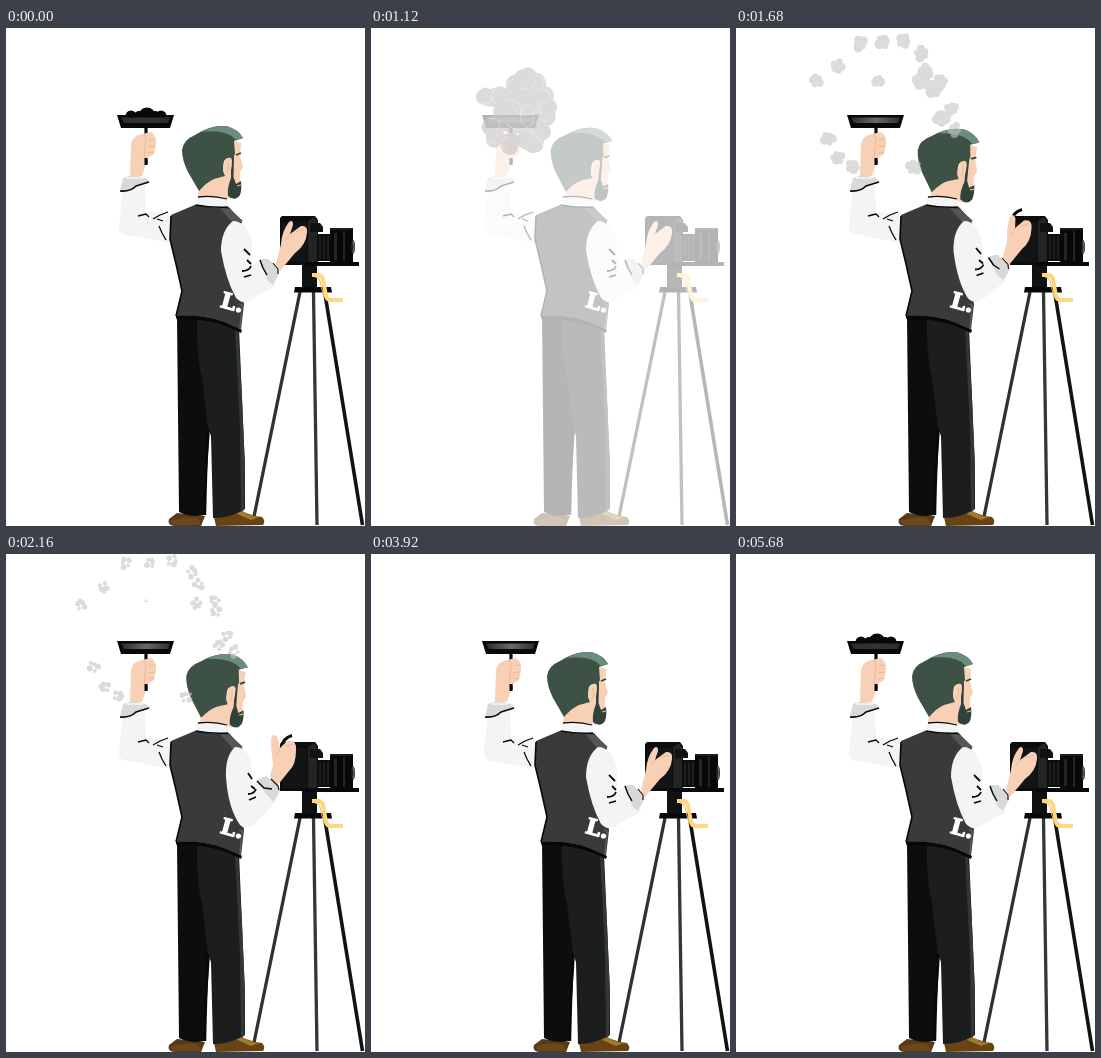
Animation, 359 px wide and 498 px high, one loop 5760 ms. Source, as an HTML page with a canvas:

```html
<!DOCTYPE html>
<html lang="en">
<head>
<meta charset="utf-8">
<title>Flash powder photographer</title>
<style>
html, body { margin: 0; width: 100%; height: 100%; overflow: hidden; background: #fff; }
canvas { display: block; }
</style>
</head>
<body>
<canvas id="stage" width="359" height="498"></canvas>
<script>
const ctx = document.getElementById('stage').getContext('2d');
const LOOP = 5760, STEP = 80;
const INK = '#070808', SKIN = '#f8d0b5', SHADE = '#e9b999', SHIRT = '#f4f4f4', CUFF = '#d9d9d9';

const mix = (a, b, k) => a + (b - a) * k;
const ramp = (t, a, b) => Math.min(1, Math.max(0, (t - a) / (b - a)));
const ease = (t, a, b) => { const k = ramp(t, a, b); return k * k * (3 - 2 * k); };

function fill(d, color) {
  ctx.fillStyle = color;
  ctx.fill(new Path2D(d));
}

function line(d, color, width = 1) {
  ctx.strokeStyle = color;
  ctx.lineWidth = width;
  ctx.stroke(new Path2D(d));
}

function box(x, y, w, h, color) {
  ctx.fillStyle = color;
  ctx.fillRect(x, y, w, h);
}

function turned(x, y, degrees, draw, dx = 0, dy = 0) {
  ctx.save();
  ctx.translate(x + dx, y + dy);
  ctx.rotate(degrees * Math.PI / 180);
  ctx.translate(-x, -y);
  draw();
  ctx.restore();
}

// Blends two path strings that share the same commands.
function blend(a, b, k) {
  const to = b.match(/[\d.]+/g);
  let i = 0;
  return a.replace(/[\d.]+/g, n => mix(+n, +to[i++], k).toFixed(2));
}

function tripod() {
  line('M294 264L247.500 491', '#303132', 3.3);
  line('M307.500 264L311 497', '#353637', 3.3);
  line('M319 266L356.500 497', '#111213', 3.6);
  box(296, 236, 15, 25, '#101112');
  fill('M289 259H325L326 264.500H288Z', INK);
  line('M306 247H313Q316 248 317 251L320 268Q321 272 325 272H337', '#ffd77f', 4);
  line('M309 249Q313 249 314 253L318 270', '#e9b957', 1);
}

function camera() {
  fill('M274 190L276 188H309L312 192V237H274Z', '#0b0c0d');
  box(276, 194, 25, 40, '#131415');
  fill('M302 193L308 189L311 193V235H302Z', '#222425');
  fill('M304 195H314L317 199V204H304Z', '#101112');
  box(312, 206, 13, 27, '#0c0d0e');
  for (let x = 314; x < 325; x += 4) line(`M${x} 208V231`, '#303233');
  box(324, 200, 23, 36, INK);
  box(328, 205, 3, 27, '#232526');
  box(337, 203, 2, 30, '#232526');
  line('M324 201H347', '#303233');
  ctx.fillStyle = '#202223';
  ctx.beginPath();
  ctx.ellipse(347, 219, 2, 7, 0, 0, 7);
  ctx.fill();
  line('M347 213Q349 219 347 225', '#777', 1);
  box(300, 234, 53, 4, INK);
}

function trousers() {
  fill('M171 485L163 491Q161 497 168 498H195L199 488Z', '#573a17');
  fill('M164 493Q177 488 191 490L196 497H168Z', '#6b491d');
  fill('M208 489L233 482Q246 488 256 489Q260 493 257 497L210 498Z', '#684314');
  fill('M229 485L236 483Q243 488 253 489L245 492Z', '#a27a2c');
  fill('M171 289L205 290L204 400L198 487Q185 490 173 484Z', '#0c0e0e');
  fill('M191 289L233 300L236 370L239 440L239 481Q225 490 207 490L205 408L202 400L196 350Q190 325 191 289Z', '#1b1e1d');
  fill('M229 300H232L236 370L239 440L238 482L235 484L234 400Z', '#343737');
  line('M202 400Q200 440 199 487', INK, 2.4);
}

function vest() {
  fill('M170 288Q204 286 236 302L235 305Q206 289 171 292Z', INK);
  fill('M165 187L191 176Q207 180 223 179L236 194L228 220L238 276L235 302Q204 285 170 288L176 263L170 235L164 211Z', '#3a3a3a');
  fill('M214 180L224 181L237 193L227 195Z', '#555656');
  line('M165 188L164 211L170 236L176 263L170 288', INK, 1.6);
  line('M170 289Q204 286 235 303', INK, 2.4);
  line('M233 276L236 277L234 301', '#5a5b5b', 1.5);
  turned(214, 280, 15, () => {
    ctx.fillStyle = ctx.strokeStyle = '#fff';
    ctx.lineWidth = 1.2;
    ctx.font = 'bold 22px "DejaVu Serif", "Noto Serif", serif';
    ctx.fillText('L.', 213, 279);
    ctx.strokeText('L.', 213, 279);
  });
}

function head(k) {
  turned(205, 172, 4.2 * k, () => {
    fill('M193 161L213 147L226 147L225 171Q207 167 192 169Z', SKIN);
    fill('M225 112L235 115L234 128L237 139L234 144L234 158L224 165L222 135Z', SKIN);
    fill('M225 126L228 128L227.500 149L230 156L235 153Q236 161 234 167Q229 174 222 168Q221 160 225 150Z', '#304338');
    fill('M176 122Q177 112 189 107Q204 97 219 98Q232 101 237 110L228 113L229 126L226 131Q221 128 218 133Q216 141 219 148L208 151Q201 154 193 163L182 144Q176 132 176 122Z', '#3e5145');
    fill('M194 104Q208 97 221 98Q232 101 237 110L230 112Q221 101 194 104Z', '#6b8d7c');
    fill('M219 132Q225 127 226 132Q226 142 223 148Q218 149 217 142Z', SKIN);
    line('M222 134Q224 140 221 145', SHADE);
    line('M230 127L235 125', '#304338', 1.8);
    line('M231 158L235 157', SHADE, 1.2);
  }, 2 * k, 2 * k);
  fill('M191 169Q206 167 221 171L223 179Q207 181 190 177Z', SHIRT);
  line('M192 169Q207 167 221 171', INK, 1.3);
  line('M190 177Q206 180 222 179', INK, 1.3);
}

function rightArm(k) {
  const sleeve = blend(
    'M227 193Q215 202 215 223Q220 252 230 270Q239 279 249 269L270 258L255 232L246 237L246 215Q241 193 227 193Z',
    'M229 193Q219 202 220 223Q222 254 234 271Q239 276 248 271L269 248L251 225L247 232L246 213Q242 193 229 193Z', k);
  fill(sleeve, SHIRT);
  line(blend('M238 221L244 227M241 232L245 236M236 243Q243 243 245 238M238 249L245 247',
             'M242 219L246 225M245 232L249 235M242 240Q248 240 250 235M243 246L250 243', k), INK, 1.8);
  const hand = blend(
    'M270 236L275 216Q276 203 283 194Q287 191 287 197L284 206L295 198Q302 197 301 205Q300 217 289 225L274 243Z',
    'M264 222L267 211Q265 195 265 184Q268 178 272 184L274 194L281 187Q291 185 290 196Q290 211 283 217L271 232Z', k);
  if (k > .4) line('M275 194Q277 184 286 181.500', INK, 3);
  fill(hand, SKIN);
  line(blend('M284 206L280 212M290 204L298 201', 'M274 194L271 202M279 193L287 190', k), SHADE);
  fill(blend('M254 231L262 231L272 240L273 246L267 257L261 252Z',
             'M251 226L260 222L272 231L274 237L268 248L260 240Z', k), CUFF);
  line(blend('M254 232L257 240L261 247', 'M251 227L258 234L266 235', k), INK, 1.5);
  line(blend('M267 235L272 241L272 246', 'M265 225L272 232L273 236', k), INK, 1.1);
}

function tray(powder) {
  ctx.fillStyle = INK;
  if (powder > 0) {
    for (const [x, r] of [[125, 5], [133, 4.5], [141, 8], [149, 4.5], [155, 5]]) {
      ctx.beginPath();
      ctx.arc(x, 88, r * powder + .5, Math.PI, 0);
      ctx.fill();
    }
  }
  line('M140 98V136', INK, 3.2);
  fill('M111 87H168L164 100H115Z', INK);
  const metal = ctx.createLinearGradient(115, 0, 165, 0);
  metal.addColorStop(0, '#2b2d2d');
  metal.addColorStop(.5, powder > .5 ? '#333535' : '#686b6b');
  metal.addColorStop(1, '#2b2d2d');
  fill('M115 89.500H164L162 95H118Z', metal);
}

function leftArm(angle, powder) {
  fill('M164 186L143 184L118 198Q116 206 123 207L164 215Z', SHIRT);
  turned(126, 200, angle, () => {
    tray(powder);
    fill('M124 149L125 116Q127 107 136 106L145 104Q151 108 150 116L148 126L142 130L136 148Z', SKIN);
    line('M138 106L140 111L138 130M143 112L149 111M142 119L149 118M142 125L148 124', SHADE);
    line('M140 130V137', INK, 3);
    fill('M117 160L139 157L140 187L126 207Q112 208 113 198Z', SHIRT);
    fill('M117 150L126 147L140 150L144 154L132 158L126 162L114 163Z', CUFF);
    line('M114 163Q124 164 130 158L143 154', INK, 1.7);
    line('M120 150L137 150', '#eee', 2);
  });
  line('M132 188L140 186L143 189M147 191L154 187L162 184M151 191L157 193M153 198L156 205L160 212', INK, 1.3);
}

// Each puff: start x, y, radius, then resting x, y.
const puffs = [
  [160, 39, 20, 145, 8], [146, 48, 17, 119, 9], [174, 43, 15, 167, 7],
  [106, 62, 14, 75, 50], [123, 61, 16, 97, 34], [181, 62, 17, 187, 18],
  [186, 84, 16, 208, 46], [177, 105, 17, 193, 31], [115, 100, 15, 88, 112],
  [118, 116, 14, 98, 133], [137, 124, 15, 113, 142], [165, 120, 18, 180, 142],
  [150, 85, 32, 140, 47], [187, 77, 15, 222, 81], [174, 124, 11, 227, 97],
  [160, 68, 28, 191, 50], [168, 88, 25, 213, 90], [138, 82, 25, 209, 57]
];

function smoke(t) {
  if (t < 1040 || t >= 2640) return;
  const grow = mix(.35, 1, ease(t, 960, 1240));
  const drift = 1 - (1 - ramp(t, 1280, 1960)) ** 2;
  const fade = 1 - .8 * ramp(t, 2160, 2640);
  const cloud = new Path2D(), curls = new Path2D();
  puffs.forEach(([x0, y0, r0, x1, y1], i) => {
    const x = mix(mix(142, x0, grow), x1, drift);
    const y = mix(mix(90, y0, grow), y1, drift);
    const far = i === 12 ? .3 : 1;
    const r = mix(r0 * .76 * grow, 2.9 * far, drift) * fade;
    const gap = mix(r0 * .3 * grow, 4.6 * far, drift);
    for (let n = 0; n < 5; n++) {
      const a = i * 1.9 + n * 1.26;
      const reach = gap * mix(1, .35 + .75 * Math.abs(Math.sin(n * 2.3 + i)), drift);
      const px = x + reach * Math.cos(a), py = y + reach * Math.sin(a);
      const pr = r * (.82 + .18 * Math.sin(n * 4 + i));
      cloud.moveTo(px + pr, py);
      cloud.arc(px, py, pr, 0, Math.PI * 2);
    }
    const a = i * 2.1, cr = r * .85;
    curls.moveTo(x + cr * Math.cos(a), y + cr * Math.sin(a));
    curls.arc(x, y, cr, a, a + 2.4);
  });
  ctx.fillStyle = 'rgba(198,198,198,.62)';
  ctx.fill(cloud);
  ctx.strokeStyle = `rgba(255,255,255,${.28 * (1 - drift)})`;
  ctx.lineWidth = 1.2;
  ctx.stroke(curls);
}

function draw(t) {
  const sway = -3 * (ease(t, 80, 640) - ease(t, 920, 1040));
  const nod = ease(t, 1000, 1200) - .25 * ease(t, 1900, 2160) - .75 * ease(t, 2160, 2560);
  const lift = ease(t, 1440, 1920) - ease(t, 3560, 3920);
  const powder = t < 1040 ? 1 : ease(t, 5120, 5600);
  const flash = t < 1040 ? 0 : (1 - ramp(t, 1040, 1520)) ** 2;

  box(0, 0, 359, 498, '#fff');
  tripod();
  camera();
  trousers();
  leftArm(sway, powder);
  vest();
  head(nod);
  rightArm(lift);
  box(0, 0, 359, 498, `rgba(255,255,255,${flash})`);
  smoke(t);
}

ctx.lineJoin = 'round';
const start = performance.now();
function tick() {
  const t = (performance.now() - start) % LOOP;
  draw(Math.floor(t / STEP) * STEP);
  requestAnimationFrame(tick);
}
tick();
</script>
</body>
</html>
```
